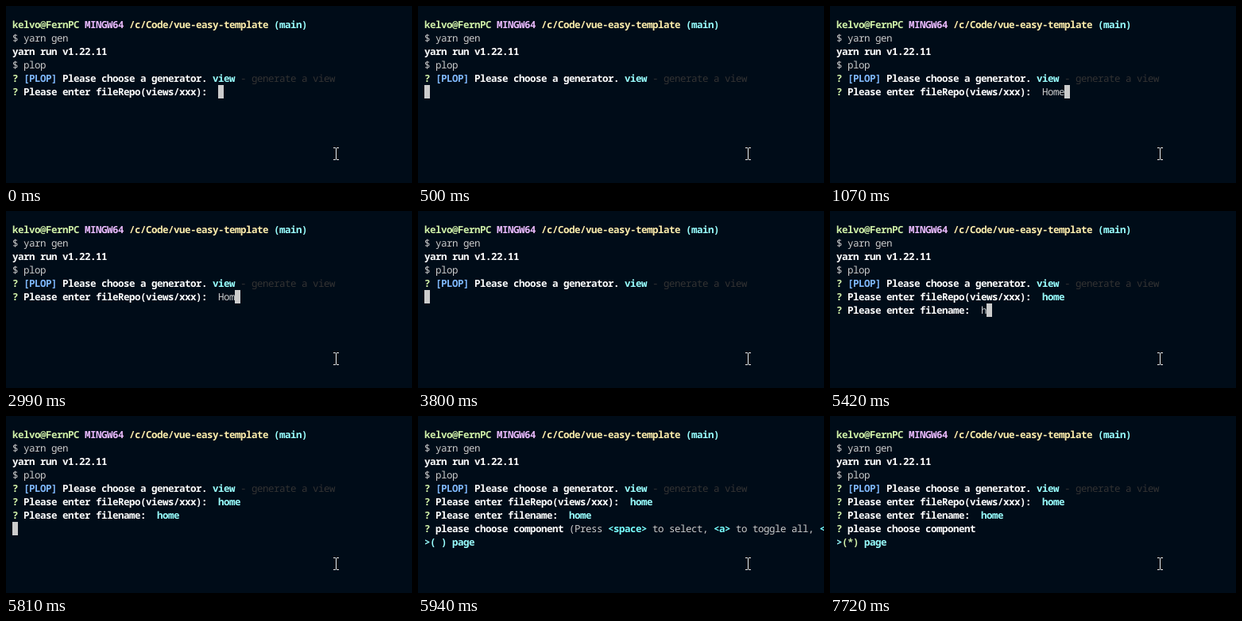
Animation, 511 px wide and 224 px high, one loop 8 s. Source, as an HTML page:

```html
<!DOCTYPE html>
<html lang="en">
<head>
<meta charset="utf-8">
<title>Terminal generator</title>
<style>
  html, body { margin: 0; width: 100%; height: 100%; overflow: hidden; background: #000c18; }
  #term {
    position: absolute; left: 8px; top: 15px; margin: 0;
    font: 500 12.5px/17px "Noto Sans Mono", "DejaVu Sans Mono", monospace;
    letter-spacing: calc(7px - 0.6em); /* 7px cells */
    text-rendering: geometricPrecision;
    font-variant-ligatures: none; white-space: pre; color: #ccc;
  }
  #term div { height: 17px; }
  b { color: #fff; }
  .green, .magenta, .yellow, .cyan { font-weight: 600; }
  .green { color: #d1f1a9; }
  .magenta { color: #ebbbff; }
  .yellow { color: #ffeead; }
  .cyan { color: #99ffff; }
  .blue { color: #80baff; }
  .key { color: #78ffff; }
  .dim { color: #333; font-weight: 400; }
  .cursor { display: inline-block; width: 7px; height: 17px; background: #ccc; vertical-align: top; }
  #mouse { position: absolute; left: 411px; top: 179px; }
</style>
</head>
<body>
<div id="term"></div>
<svg id="mouse" width="9" height="17" viewBox="0 0 9 17" fill="none" stroke="#eee">
  <path d="M1 .5H4M5 .5H8M4.5 1V15M1 15.5H4M5 15.5H8"/>
</svg>
<script>
const LOOP = 8000;
const term = document.getElementById('term');

const paint = (color, text) => `<span class="${color}">${text}</span>`;
const bold = (text, color = '') => `<b class="${color}">${text}</b>`;
const key = name => bold(`&lt;${name}&gt;`, 'key');
const ask = text => paint('green', '?') + ' ' + bold(text);
const cursor = paint('cursor', '');

const repo = ask('Please enter fileRepo(views/xxx):') + '  ';
const file = ask('Please enter filename:') + '  ';
const pick = ask('please choose component');
const home = paint('cyan', 'home');

const header = [
  [paint('green', 'kelvo@FernPC'), paint('magenta', 'MINGW64'),
   paint('yellow', '/c/Code/vue-easy-template'), paint('cyan', '(main)')].join(' '),
  '$ yarn gen',
  bold('yarn run v1.22.11'),
  '$ plop',
  paint('green', '?') + ' ' + bold('[PLOP]', 'blue') + ' ' + bold('Please choose a generator.') +
    ' ' + paint('cyan', 'view') + paint('dim', ' - generate a view')
];

const typeRepo = text => [repo + text + cursor];
const typeFile = text => [repo + home, file + text + cursor];
const answered = [repo + home, file + home];
const hint = ` (Press ${key('space')} to select, ${key('a')} to toggle all, ${key('i')}`;

// [start time, lines below the header]
const steps = [
  [0, typeRepo('')],
  [500, [cursor]],
  [650, typeRepo('H')],
  [950, typeRepo('Hom')],
  [1070, typeRepo('Home')],
  [2990, typeRepo('Hom')],
  [3140, typeRepo('Ho')],
  [3260, typeRepo('H')],
  [3410, typeRepo('')],
  [3680, typeRepo('h')],
  [3800, [cursor]],
  [3950, typeRepo('home')],
  [4210, typeFile('')],
  [5420, typeFile('h')],
  [5540, typeFile('hom')],
  [5660, typeFile('home')],
  [5810, [...answered, cursor]],
  [5940, [...answered, pick + hint, paint('cyan', '&gt;( ) page')]],
  [7720, [...answered, pick,
    paint('cyan', '&gt;') + paint('green', '(*)') + paint('cyan', ' page')]]
];

let shown = -1;
function draw() {
  const t = performance.now() % LOOP;
  const now = steps.findLastIndex(([start]) => start <= t);
  if (now !== shown) {
    shown = now;
    term.innerHTML = [...header, ...steps[now][1]].map(line => `<div>${line}</div>`).join('');
  }
  requestAnimationFrame(draw);
}
draw();
</script>
</body>
</html>
```
